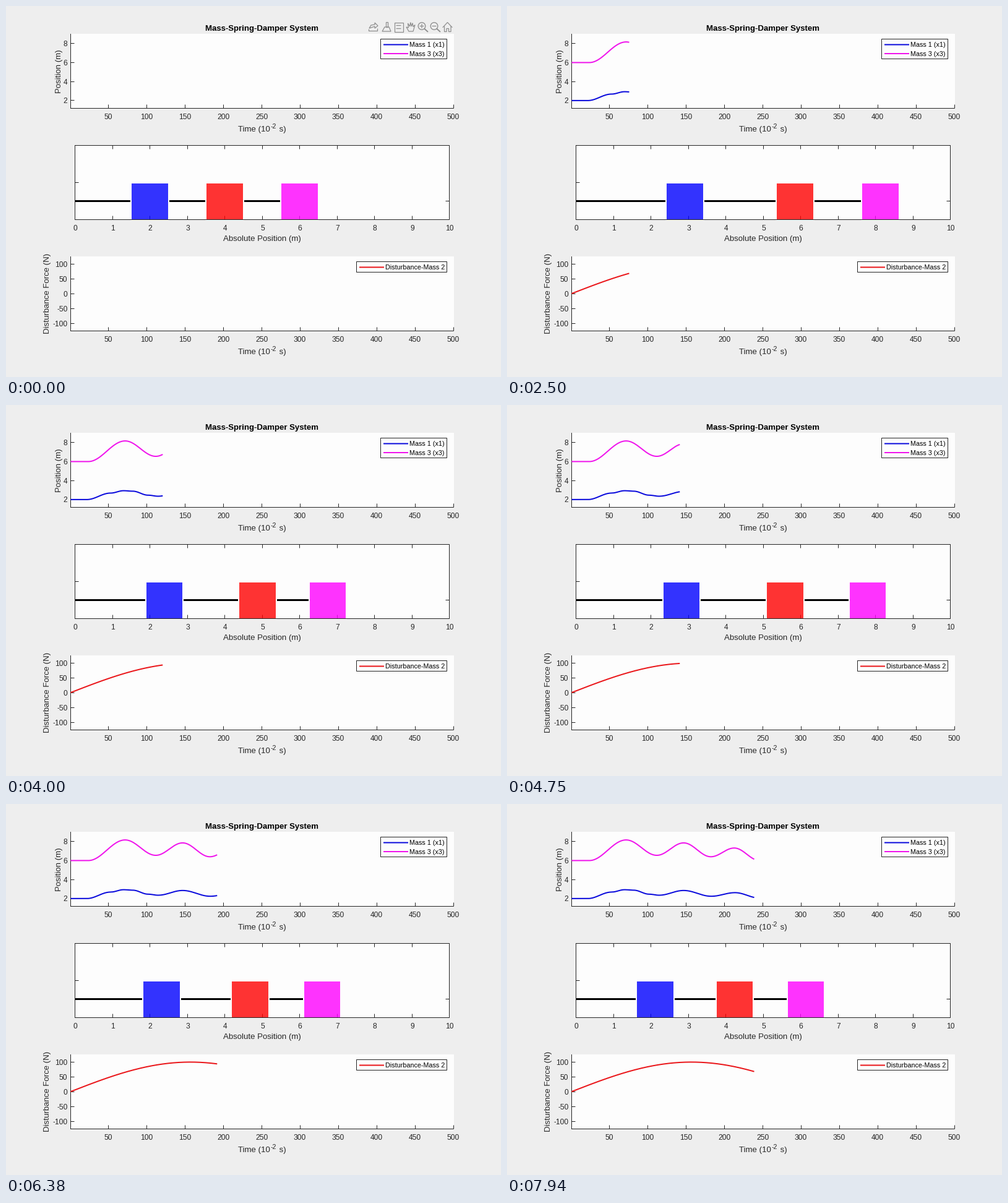
A matplotlib script that plays this animation: 800 by 600 pixels, repeating every 8 s.

```python
import numpy as np
import matplotlib.pyplot as plt
from matplotlib.animation import FuncAnimation
from matplotlib.patches import Circle, Polygon, Rectangle

plt.rcParams["font.family"] = "Liberation Sans"
W, H, PT = 800, 600, 0.72          # stage size, points per pixel
FRAMES, INTERVAL = 200, 40
STEP, RATE = 62.5, 0.03            # ms per redraw, samples per ms
INK, PAPER, ICON = "#262626", "#fdfdfd", "#8c8c8c"
BLUE, RED, PINK = "#0a0adc", "#ea161a", "#f014ec"

fig = plt.figure(figsize=(8, 6), dpi=100, facecolor="#eeeeee")
ax = fig.add_axes([0, 0, 1, 1])
ax.set_xlim(0, W)
ax.set_ylim(H, 0)
ax.axis("off")


def line(x, y, color=INK, w=1.0, z=3, cap="butt"):
    return ax.plot(x, y, color=color, lw=w * PT, zorder=z, snap=False,
                   solid_capstyle=cap, solid_joinstyle="miter")[0]


def tick(x, y, dx, dy):
    x, y = int(x) + 0.5, int(y) + 0.5
    line([x, x + dx], [y, y + dy], z=2)


def label(x, y, s, px=12.0, ha="center", color=INK, **kw):
    ax.text(x, y, s, fontsize=px * PT, ha=ha, va="baseline", color=color,
            zorder=6, **kw)


def box(x0, y0, x1, y1, edge="none", z=1):
    ax.add_patch(Rectangle((x0, y0), x1 - x0, y1 - y0, fc=PAPER, ec=edge,
                           lw=PT, zorder=z, snap=False))


def time_x(n):
    return 104.5 + (n - 1) * 1.2395


def pos_y(v):
    return 152.9 - 15.36 * (v - 2)


def force_y(f):
    return 465.6 - 0.482 * f


def meter_x(m):
    return 111.5 + 60.5 * m


def time_axes(top, values, to_y):
    base = top + 120.5
    box(104, top, 724, base)
    line([104.5, 104.5], [top, base + 0.5])
    line([104, 723.5], [base, base])
    for n in range(50, 501, 50):
        tick(time_x(n), base, 0, -6)
        label(time_x(n), base + 17.8, str(n))
    for v in values:
        tick(104.5, to_y(v), 6, 0)
        label(99.5, to_y(v) + 4.4, str(v), ha="right")
    label(375, base + 37.5, "Time (10", 13.2, "left")
    label(428, base + 32, "-2", 10.6, "left")
    label(437.6, base + 37.5, " s)", 13.2, "left")


def legend(x, y, h, rows):
    box(x, y, 712.5, y + h, INK, 5)
    for i, (s, color) in enumerate(rows):
        yy = y + 9 + 14.5 * i
        line([x + 4.5, x + 44.5], [yy, yy], color, 2, 6)
        label(x + 46.7, yy + 3.8, s, 10.8, "left", "black")


def swing(n, times, values):
    """Cosine easing from one turning point to the next."""
    i = np.clip(np.searchsorted(times, n, "right") - 1, 0, len(times) - 2)
    t, v = np.array(times, float), np.array(values, float)
    u = np.clip((n - t[i]) / (t[i + 1] - t[i]), 0, 1)
    return v[i] + (v[i + 1] - v[i]) * (1 - np.cos(np.pi * u)) / 2


# Mass positions in metres and the force, one value per sample
n = np.arange(1, 242)
x1 = 2 + swing(n, [22, 53, 70, 82, 102, 115, 147, 183, 214, 246],
               [0, .68, .93, .88, .46, .35, .85, .24, .62, .05])
x2 = 4 + swing(n, [8, 72, 115, 146, 185, 211, 246],
               [0, 1.87, .80, 1.62, .58, 1.15, .14])
x3 = 6 + swing(n, [24, 72, 112, 147, 182.5, 213, 246],
               [0, 2.17, .55, 1.86, .40, 1.32, 0])
force = 100 * np.sin(0.01 * n)

# Top and bottom plots
time_axes(45, (2, 4, 6, 8), pos_y)
time_axes(405, (-100, -50, 0, 50, 100), force_y)
label(413, 40, "Mass-Spring-Damper System", 13.2, color="black",
      weight="bold")
side = dict(rotation=90, rotation_mode="anchor")
label(88.5, 105.5, "Position (m)", 13.2, **side)
label(70.3, 465, "Disturbance Force (N)", 13.2, **side)
legend(605.5, 53.5, 32, [("Mass 1 (x1)", BLUE), ("Mass 3 (x3)", PINK)])
legend(566.5, 413.5, 17, [("Disturbance-Mass 2", RED)])

# Middle view
box(111.5, 225.5, 716.5, 345.5)
for m in range(11):
    tick(meter_x(m), 225, 0, 6)
    tick(meter_x(m), 345, 0, -6)
    label(meter_x(m) + 0.7, 363.3, str(m))
tick(111, 285, 6, 0)
tick(716, 315, -6, 0)
line([111.5, 716.5, 716.5, 111.5, 111.5],
     [225.5, 225.5, 345.5, 345.5, 225.5], z=5)
label(413.7, 380.4, "Absolute Position (m)", 13.2)

HALF = 30.25
blocks, rods = [], []
for rgb in ((0, 0, 1), (1, 0, 0), (1, 0, 1)):
    block = Rectangle((0, 285.5), 2 * HALF, 60, fc=rgb + (0.8,), ec=PAPER,
                      lw=2 * PT, zorder=4)
    blocks.append(ax.add_patch(block))
    rods.append(line([], [], "black", 3))

curves = [(line([], [], BLUE, 2, 4), pos_y(x1)),
          (line([], [], PINK, 2, 4), pos_y(x3)),
          (line([], [], RED, 2, 4), force_y(force))]


def toolbar():
    parts = []

    def stroke(*pts, w=1.2):
        xs, ys = zip(*pts)
        parts.append(line(xs, ys, ICON, w, 7, "round"))

    def shape(*pts):
        parts.append(ax.add_patch(Polygon(pts, fc="none", ec=ICON,
                                          lw=1.2 * PT, zorder=7)))

    # export
    shape((587, 36), (590, 31), (596, 30), (596, 27), (601, 32), (596, 36),
          (596, 33))
    stroke((586.5, 38), (586.5, 40.5), (600.5, 40.5), (600.5, 37))
    # brush
    shape((614, 26), (617, 26), (617, 34), (614, 34))
    shape((612, 34), (619, 34), (622, 41), (608, 41))
    # data tips
    shape((627.5, 26.5), (641.5, 26.5), (641.5, 41.5), (627.5, 41.5))
    for y in (31.5, 36.5):
        stroke((631, y), (638, y))
    # hand
    shape((651, 41), (647, 34), (650.5, 35), (649.5, 28), (652.5, 33),
          (653.8, 26.5), (655.2, 33), (657, 27.5), (658, 33.5),
          (661, 30.5), (658, 41))
    # zoom in and out
    for x in (672, 692):
        parts.append(ax.add_patch(Circle((x, 32.5), 5.8, fc="none", ec=ICON,
                                         lw=1.3 * PT, zorder=7)))
        stroke((x + 4.3, 36.8), (x + 9.5, 41.5), w=1.8)
        stroke((x - 3, 32.5), (x + 3, 32.5))
    stroke((672, 29.5), (672, 35.5))
    # home
    stroke((706, 34.5), (713.5, 26.5), (721, 34.5))
    stroke((708.5, 33), (708.5, 41.5), (712, 41.5), (712, 36.5),
           (715.5, 36.5), (715.5, 41.5), (719, 41.5), (719, 33))
    return parts


tools = toolbar()


def update(i):
    # the picture is redrawn every STEP ms, taken at the nearest tick
    redraw = int((i + 0.5) * INTERVAL / STEP)
    k = 1 + int(RATE * STEP * redraw + 0.5)
    for curve, y in curves:
        curve.set_data(time_x(n[:k]), y[:k])
    start = meter_x(0)
    for block, rod, x in zip(blocks, rods, (x1, x2, x3)):
        left = meter_x(x[k - 1]) - HALF
        block.set_x(left)
        rod.set_data([start, left], [315.5, 315.5])
        start = left + 2 * HALF
    for part in tools:
        part.set_visible(redraw == 0)
    return []


anim = FuncAnimation(fig, update, frames=FRAMES, interval=INTERVAL,
                     init_func=lambda: update(0), repeat=True,
                     repeat_delay=0, blit=False)
plt.show()
```
